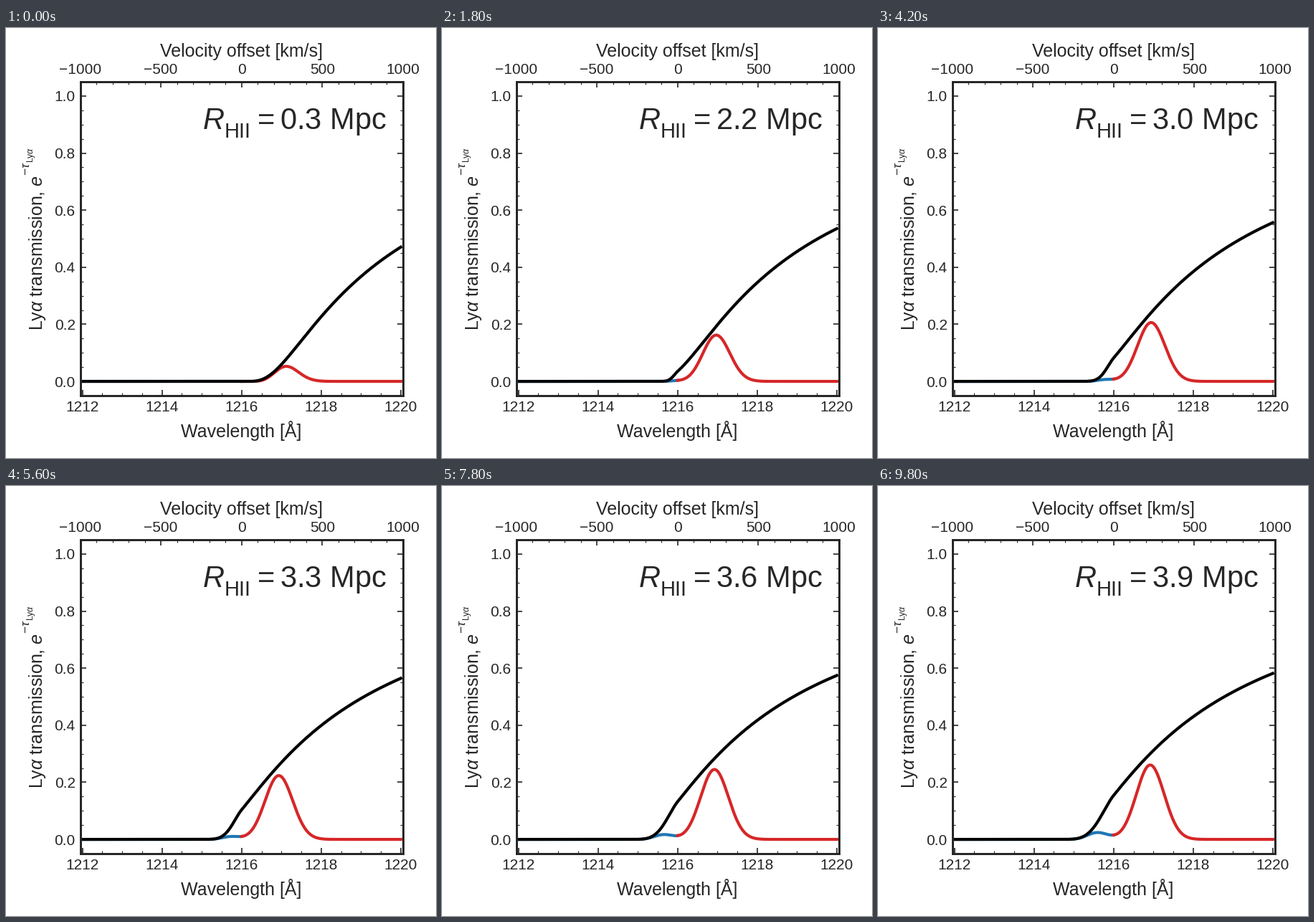
Write a matplotlib script that moves like this. It is 600 px wide and 600 px high and loops after 10 s.

```python
import numpy as np
import matplotlib.pyplot as plt
from matplotlib.animation import FuncAnimation
from matplotlib.ticker import AutoMinorLocator, MultipleLocator

INK = "0.15"
SIZE = 600
FRAMES, INTERVAL = 50, 200
LAM0, C_KMS = 1216.0, 299792.458

plt.rcParams.update({
    "font.family": "Liberation Sans",
    "mathtext.fontset": "custom",
    "mathtext.rm": "Liberation Sans",
    "mathtext.it": "Liberation Sans:italic",
    "mathtext.bf": "Liberation Sans:bold",
    "text.color": INK,
    "axes.edgecolor": INK,
    "axes.linewidth": 2,
    "xtick.color": INK,
    "ytick.color": INK,
})


def bubble_radius(frame):
    """Ionized volume grows linearly with time."""
    return np.cbrt(0.04 + 1.228 * frame)


def transmission(v, radius):
    """Damping wing beyond the bubble edge plus residual gas inside it."""
    gap = v + 108 * radius
    wing = 949.5 / np.maximum(gap, 1) ** 1.03
    residual = 0.0078 * np.minimum(v, 0) ** 2 / radius ** 4
    return np.where(gap > 1, np.exp(-wing - residual), 0)


def emission(v, center=212, sigma=88.5):
    peaks = [np.exp(-0.5 * ((v - c) / sigma) ** 2) for c in (-center, center)]
    return 0.88 * sum(peaks)


wave = np.linspace(1212, 1220, 1601)
vel = (wave / LAM0 - 1) * C_KMS
blue, red = vel <= 1e-6, vel >= -1e-6
line = emission(vel)

fig = plt.figure(figsize=(6, 6), dpi=100, facecolor="white")
left, right, top, bottom = 103.6, 553.9, 75, 513
ax = fig.add_axes([left / SIZE, 1 - bottom / SIZE,
                   (right - left) / SIZE, (bottom - top) / SIZE])
vax = ax.twiny()

half = LAM0 * 1000 / C_KMS
ax.set_xlim(LAM0 - half, LAM0 + half)
ax.set_ylim(-0.05, 1.05)
vax.set_xlim(-1000, 1000)
ax.xaxis.set_major_locator(MultipleLocator(2))
ax.yaxis.set_major_locator(MultipleLocator(0.2))
vax.xaxis.set_major_locator(MultipleLocator(500))
for axis, parts in ((ax.xaxis, 4), (ax.yaxis, 4), (vax.xaxis, 5)):
    axis.set_minor_locator(AutoMinorLocator(parts))
for a in (ax, vax):
    a.tick_params(which="major", direction="in", length=5.5, width=1.2,
                  pad=5, labelsize=15)
    a.tick_params(which="minor", direction="in", length=3, width=0.8)
ax.tick_params(axis="y", which="both", right=True)


def put(x, y, text, size, **kw):
    """Text with its baseline anchored at a pixel position."""
    return fig.text(x / SIZE, 1 - y / SIZE, text, size=size, va="baseline",
                    rotation_mode="anchor", **kw)


mid = (left + right) / 2
put(mid - 0.5, 571.3, "Wavelength [Å]", 18, ha="center")
put(mid - 0.2, 39.8, "Velocity offset [km/s]", 18, ha="center")

# Scripts are placed by hand: they sit further out than mathtext puts them.
base = 50.5
put(base, 421.9, r"Ly$\alpha$ transmission, $e$", 18, rotation=90)
put(base - 17.4, 205.8, r"$-\tau$", 18 * 0.7, rotation=90)
put(base - 12.2, 188.4, r"Ly$\alpha$", 18 * 0.49, rotation=90)

put(274.2, 140.7, "$R$", 30)
put(305, 153.1, "HII", 30 * 0.7)
label = put(531.3, 140.7, "", 30, ha="right")

blue_line, = ax.plot([], [], color="#1f77b4", lw=3)
red_line, = ax.plot([], [], color="#d62728", lw=3)
trans_line, = ax.plot([], [], color="black", lw=3)


def update(frame):
    radius = bubble_radius(frame)
    trans = transmission(vel, radius)
    seen = line * trans
    blue_line.set_data(wave[blue], seen[blue])
    red_line.set_data(wave[red], seen[red])
    trans_line.set_data(wave, trans)
    label.set_text(f"$={radius:.1f}$ Mpc")
    return blue_line, red_line, trans_line, label


anim = FuncAnimation(fig, update, frames=FRAMES, interval=INTERVAL,
                     repeat=True, repeat_delay=0)
plt.show()
```
